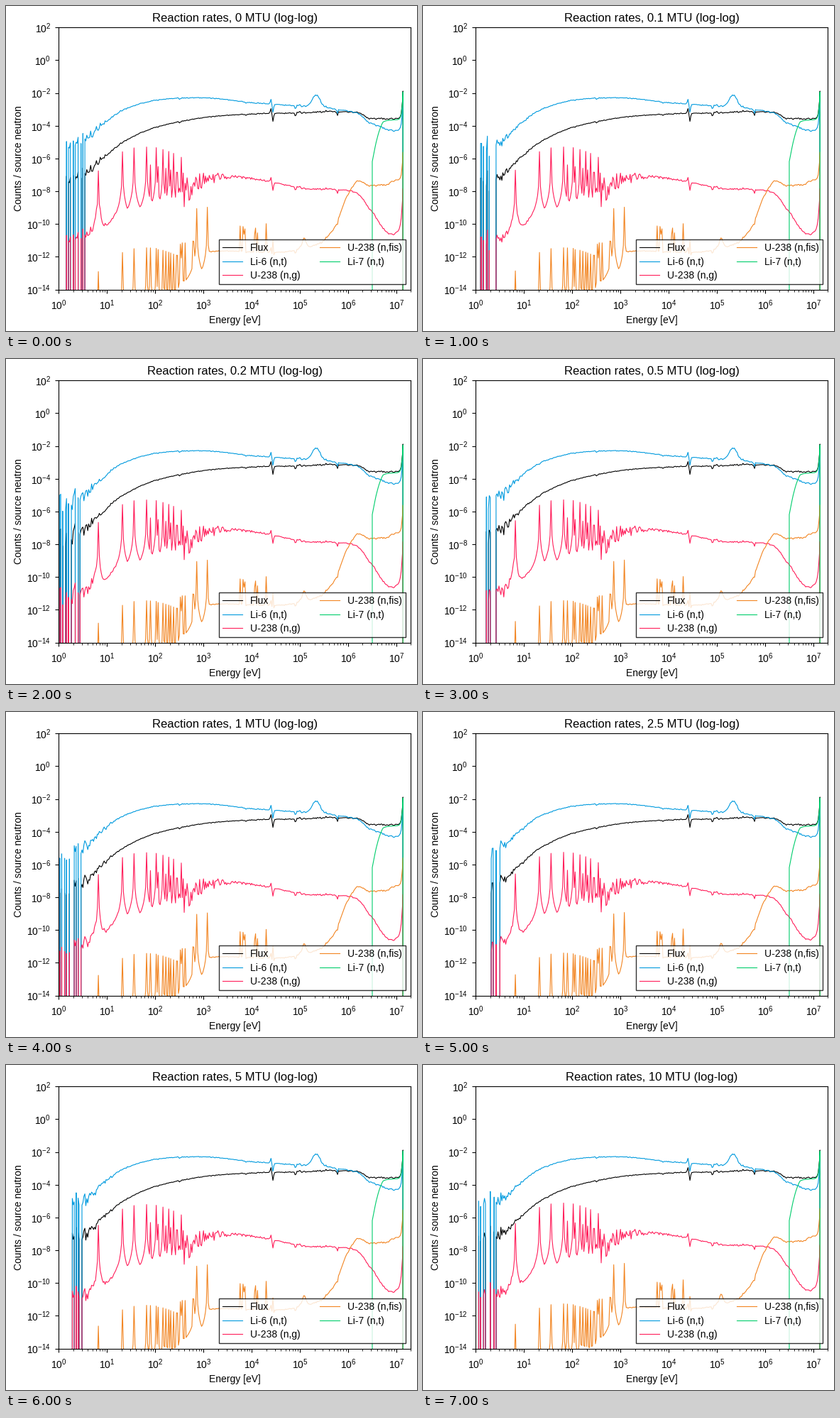
Recreate the animation shown at these times as a matplotlib script. Size 579x458 px, loop 8 s.

```python
import numpy as np
import matplotlib.pyplot as plt
from matplotlib.animation import FuncAnimation

W, H, DPI = 579, 458, 100
LEFT, TOP = 74.5, 30.2          # stage position of 1 eV and of 10^2 counts
DEC_X, DEC_Y = 67.93, 23.09     # stage pixels per decade
BIN = DEC_X / 50

plt.rcParams.update({
    "font.family": "Liberation Sans",
    "font.size": 10,
    "lines.linewidth": 0.8,
})

# Fuel mass, first energy bin ever hit, and where every bin is hit
CASES = [
    ("0", 85.5, 110), ("0.1", 81.5, 104), ("0.2", 75.5, 104),
    ("0.5", 89, 103), ("1", 75.5, 105), ("2.5", 96, 109),
    ("5", 93.5, 106), ("10", 78.6, 102),
]
STYLES = [
    ("Flux", "black"),
    ("Li-6 (n,t)", "#009ADE"),
    ("U-238 (n,g)", "#FF1F5B"),
    ("U-238 (n,fis)", "#F28522"),
    ("Li-7 (n,t)", "#00CD6C"),
]
# Resonance energies in eV
STRONG = [6.67, 20.9, 36.7, 66, 102.5, 145.7, 189.6, 237, 348]
WEAK = [80.7, 117, 165, 208, 274, 291]

rng = np.random.default_rng(7)
xs = np.append(np.arange(LEFT, 558, BIN), [558.6, 559.3, 559.7])
energy = 10 ** ((xs - LEFT) / DEC_X)


def stage_x(ev):
    return LEFT + DEC_X * np.log10(ev)


def smooth(*points):
    """Monotone cubic curve through (x, y) key points."""
    px, py = np.array(points, float).T
    d = np.diff(py) / np.diff(px)
    total = d[:-1] + d[1:]
    inner = 2 * np.maximum(d[:-1] * d[1:], 0) / (abs(total) + 1e-9)
    m = np.concatenate([d[:1], inner * np.sign(total), d[-1:]])
    i = np.clip(np.searchsorted(px, xs) - 1, 0, len(px) - 2)
    h = px[i + 1] - px[i]
    t = (xs - px[i]) / h
    return ((1 + 2 * t) * (1 - t)**2 * py[i] + t * (1 - t)**2 * h * m[i]
            + t**2 * (3 - 2 * t) * py[i + 1] + t**2 * (t - 1) * h * m[i + 1])


def bump(x0, height, width):
    return height * np.exp(-((xs - x0) / width)**2)


def add_peaks(y, centres, top, width):
    """Raise the curve to sharp resonances with 1/dx^2 wings."""
    for x0 in centres:
        i = np.argmin(abs(xs - x0))
        wing = 2 * DEC_Y * np.log10(1 + abs(xs - xs[i]) / width)
        y = np.minimum(y, top[i] + wing)
    return y


# All curves are heights in stage pixels; reactions are offsets from the flux.
flux = smooth((75, 252), (108, 241), (135, 216), (165, 192), (205, 173),
              (245, 163), (290, 156), (350, 152), (420, 150.5),
              (460, 148.5), (495, 150), (513, 158.5), (560, 159))
for x0, depth in [(245, 2), (338, 1.5), (373.5, -7), (376, 12),
                  (408, 4), (467, 6)]:
    flux += bump(x0, depth, 1.3)
edge = 39 * np.exp((xs - 559.3) / 1.5)
flux += rng.normal(0, 0.35 + 0.3 * (xs > 400)) - edge

li6 = flux + bump(437, -17, 8) + smooth(
    (75, -49), (135, -48), (205, -39), (290, -26), (350, -15.5),
    (420, -9), (460, -4), (490, 0), (512, 6), (550, 17), (560, 13))

top = flux + 9 + 0.003 * (xs - 130)**2
strong, weak = stage_x(STRONG), stage_x(WEAK)

capture = flux + smooth(
    (75, 103), (108, 99), (125, 88), (150, 104), (190, 117), (225, 122),
    (250, 100), (300, 86), (340, 90), (380, 98), (430, 108), (485, 111),
    (500, 117), (518, 134), (530, 153), (544, 163), (553, 158), (560, 135))
ragged = 32 * np.exp(-abs(xs - 250) / 30) * (xs > 225)
capture += ragged * rng.uniform(-1, 1, xs.size)
capture = add_peaks(capture, strong, top, 0.13)
capture = add_peaks(capture, weak, top + 25, 0.13)

fission = flux + bump(420, -14, 4) + smooth(
    (75, 260), (260, 260), (276, 235), (284, 190), (380, 196), (440, 186),
    (460, 168), (482, 116), (497, 96), (515, 94.5), (535, 93), (548, 87),
    (560, 86))
fission = add_peaks(fission, np.append(strong, weak), top + 142, 0.1)
fission = add_peaks(fission, rng.uniform(245, 266, 5), flux + 172, 0.1)
fission = add_peaks(fission, stage_x([721, 1211]), flux + 127, 0.1)
for x0 in rng.uniform(326, 380, 10):
    fission = add_peaks(fission, [x0], flux + rng.uniform(155, 172), 0.25)

li7 = smooth((515.5, 222), (519, 204), (522, 190), (527, 173), (532, 163),
             (540, 161), (560, 160)) - edge

scatter = 9 * np.exp(-np.maximum(xs - 95, 0) / 22)


def counts(y, hit):
    return np.where(hit, 10 ** (2 - (y - TOP) / DEC_Y), 0)


fig = plt.figure(figsize=(W / DPI, H / DPI), dpi=DPI, facecolor="white")
ax = fig.add_axes([74.4 / W, 58.4 / H, 496 / W, 369.4 / H])
ax.set_xscale("log")
ax.set_yscale("log", nonpositive="clip")
ax.set_xlim(1, 2e7)
ax.set_ylim(1e-14, 1e2)
ax.tick_params(axis="x", pad=6)
ax.tick_params(axis="y", pad=4.7)
ax.set_xlabel("Energy [eV]", labelpad=3.3)
ax.set_ylabel("Counts / source neutron", labelpad=2.8)
title = ax.set_title("")
lines = [ax.plot(energy, np.ones_like(energy), color=c, label=name)[0]
         for name, c in STYLES]
ax.legend(loc="lower right", ncol=2, fancybox=False, edgecolor="black",
          framealpha=0.8, labelspacing=0.39, borderpad=0.35,
          borderaxespad=0.55)


def draw(i):
    mass, first, full = CASES[i]
    title.set_text(f"Reaction rates, {mass} MTU (log-log)")
    local = np.random.default_rng(20 + i)
    noise = scatter * local.normal(0, 1, xs.size)
    hit = (local.random(xs.size) < 0.45) | (abs(xs - first) < BIN / 2)
    hit = (hit & (xs > first - BIN / 2)) | (xs > full)
    hit[-1] = False
    rise = 0.4 * float(mass)
    curves = [flux, li6, capture - rise, fission - rise]
    for line, y in zip(lines, curves):
        line.set_ydata(counts(y + noise, hit))
    lines[-1].set_ydata(counts(li7, hit & (xs > 515.2)))
    return lines + [title]


anim = FuncAnimation(fig, draw, frames=len(CASES), interval=1000,
                     repeat=True, repeat_delay=0, blit=False)
plt.show()
```
